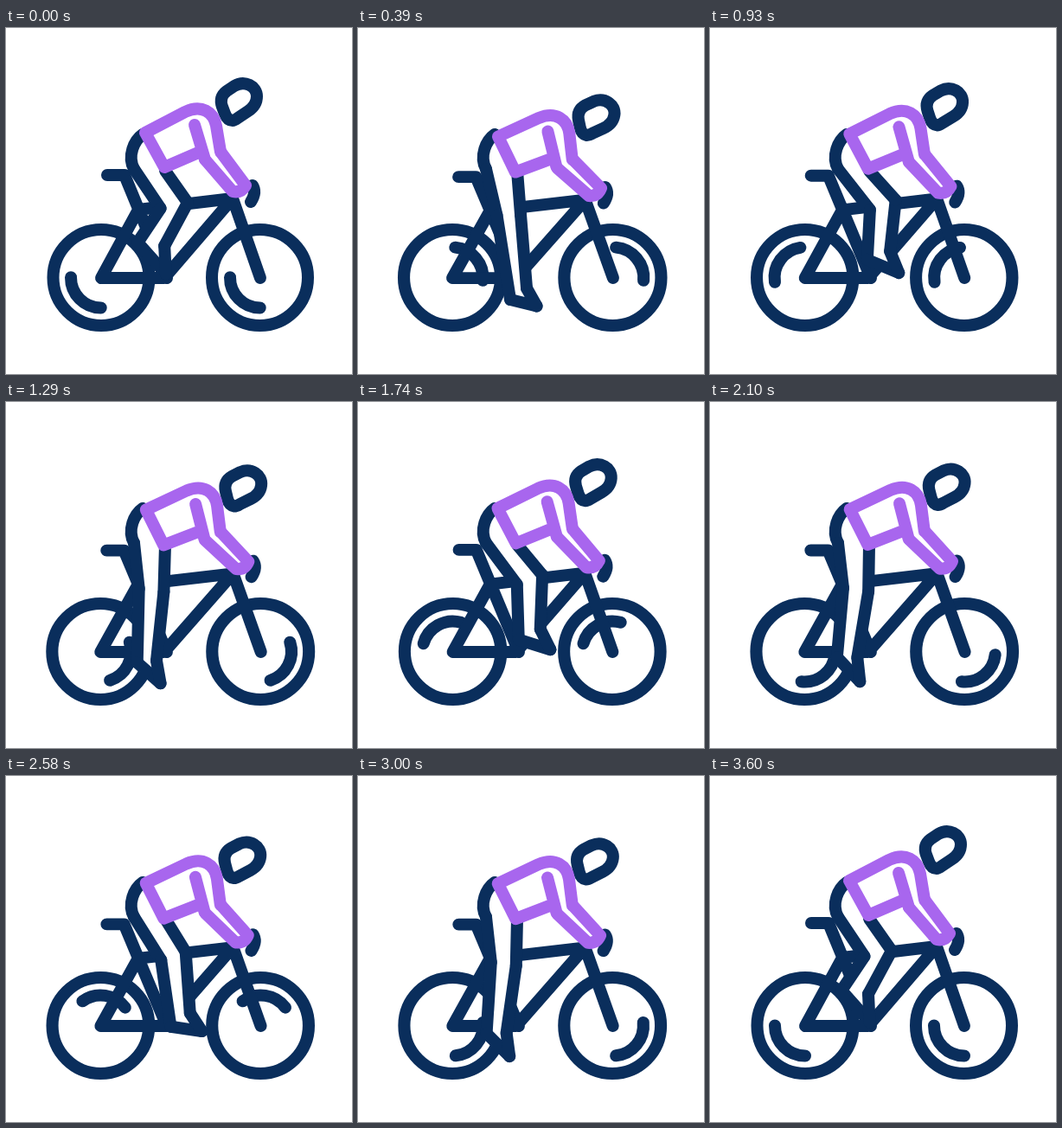
These frames come from a looping animation (400 px wide and 400 px high, 5.63 s). An HTML page without scripts:

```html
<!DOCTYPE html>
<html lang="en">
<head>
<meta charset="utf-8">
<title>Cyclist</title>
<style>
@property --turn { syntax: "<angle>"; inherits: true; initial-value: 0deg; }
@property --spin { syntax: "<angle>"; inherits: true; initial-value: 0deg; }

html, body { margin: 0; width: 100%; height: 100%; overflow: hidden; background: #fff; }
svg { display: block; width: 100%; height: 100%; animation: ride 5630ms linear infinite; }

/* Four turns of pedals and wheels: steady, then coasting to rest */
@keyframes ride {
  0% { --turn: 0deg; --spin: 0deg; }
  47.96% { --turn: 1242deg; --spin: 1280deg; animation-timing-function: cubic-bezier(.3, .4, .7, .8); }
  63.94%, 100% { --turn: 1440deg; --spin: 1440deg; }
}

.line {
  --c: cos(var(--turn));
  --s: sin(var(--turn));
  --bob: calc((1 - var(--c)) / 2);
  fill: none; stroke: #0a2e5c; stroke-width: 14; stroke-linecap: round; stroke-linejoin: round;
}
.shirt { stroke: #a866ee; }
.solid { fill: #fff; }

.wheels { transform-origin: 202px 289px; transform: scale(calc(1 + .01 * var(--bob)), 1); }
.shine { transform: rotate(var(--spin)); }
.rear { transform-origin: 110px 288.5px; }
.front { transform-origin: 294px 288.5px; }
.frame {
  transform-origin: 202px 290px;
  transform: scale(calc(1 + .01 * var(--bob)), calc(1 - .018 * var(--bob)));
}
.head {
  transform-origin: 270px 86px;
  transform: translate(calc(5.5px * var(--bob)), calc(18.5px * var(--bob))) rotate(calc(9deg * var(--bob)));
}
.body {
  transform-origin: 161px 121px;
  transform: translate(calc(1px * var(--bob)), calc(4.5px * var(--bob))) rotate(calc(3deg * var(--bob)));
}
.forearm { transform-origin: 240px 147px; transform: rotate(calc(-11deg * var(--bob))); }

/* Joints circle with the pedals: back of knee, heel, toe, ankle, kneecap */
.leg {
  --bx: calc(169.5 + 9 * var(--c) + 13 * var(--s));
  --by: calc(212.5 - 4 * var(--c) - 1 * var(--s));
  --hx: calc(164 - 12 * var(--c) + 24 * var(--s));
  --hy: calc(281 - 33 * var(--c) - 1 * var(--s));
  --tx: calc(195.5 - 11 * var(--c) + 29 * var(--s));
  --ty: calc(303 - 18.5 * var(--c) - 14 * var(--s));
  --ax: calc(189 - 6 * var(--c) + 23 * var(--s));
  --ay: calc(276.5 - 24.5 * var(--c) - 10 * var(--s));
  --kx: calc(199 + 11 * var(--c) + 12.5 * var(--s));
  --ky: calc(209 - 7 * var(--c) - 8 * var(--s));
}
.skin {
  fill: #fff; stroke: none;
  clip-path: polygon(158px 122px, 146px 148px, 148px 163px,
    calc(var(--bx) * 1px) calc(var(--by) * 1px), calc(var(--hx) * 1px) calc(var(--hy) * 1px),
    calc(var(--tx) * 1px) calc(var(--ty) * 1px), calc(var(--ax) * 1px) calc(var(--ay) * 1px),
    calc(var(--kx) * 1px) calc(var(--ky) * 1px), 184px 165px);
}
/* A stroke from (x, y) to (u, v), cut to length by its dash */
.edge {
  --dx: calc(var(--u) - var(--x));
  --dy: calc(var(--v) - var(--y));
  transform: translate(calc(var(--x) * 1px), calc(var(--y) * 1px)) rotate(atan2(var(--dy), var(--dx)));
  stroke-dasharray: calc(hypot(var(--dx), var(--dy)) * 1px) 999px;
}
.thigh-back { --x: 148; --y: 163; --u: var(--bx); --v: var(--by); }
.calf { --x: var(--bx); --y: var(--by); --u: var(--hx); --v: var(--hy); }
.sole { --x: var(--hx); --y: var(--hy); --u: var(--tx); --v: var(--ty); }
.instep { --x: var(--tx); --y: var(--ty); --u: var(--ax); --v: var(--ay); }
.shin { --x: var(--ax); --y: var(--ay); --u: var(--kx); --v: var(--ky); }
.thigh-front { --x: var(--kx); --y: var(--ky); --u: 184; --v: 165; }
</style>
</head>
<body>
<svg viewBox="0 0 400 400">
  <g class="line">
    <g class="wheels">
      <circle cx="110" cy="288.5" r="55.5"/>
      <circle cx="293.5" cy="288.5" r="55.5"/>
      <path class="shine rear" d="M75 288.5A35 35 0 0 0 110 323.5"/>
      <path class="shine front" d="M259 288.5A35 35 0 0 0 294 323.5"/>
    </g>
    <g class="frame">
      <path d="M117 170H137L186 289M153 210L110 289H183L262 197L153 210M262 197L294 289"/>
      <path d="M285 182Q290 190 283 201"/>
    </g>
    <g class="leg">
      <rect class="skin" width="400" height="400"/>
      <path d="M158 123C148 130 140 148 148 163"/>
      <path class="edge thigh-back" d="M0 0H200"/>
      <path class="edge calf" d="M0 0H200"/>
      <path class="edge sole" d="M0 0H200"/>
      <path class="edge instep" d="M0 0H200"/>
      <path class="edge shin" d="M0 0H200"/>
      <path class="edge thigh-front" d="M0 0H200"/>
    </g>
    <path class="head" d="M262 107Q256 107 253 99L250 91Q246 80 255 73L264 67C276 60 290 67 290 79C290 87 286 92 280 96L268 104Q264 107 262 107Z"/>
  </g>
  <g class="line shirt">
    <g class="body">
      <path class="forearm solid" d="M248 143L277 182Q272 191 262 189L230 152"/>
      <path class="solid" d="M161 121L207 97C226 88 240 97 243 113L248 143L230 152L218 112" stroke="none"/>
      <path d="M161 121L207 97C226 88 240 97 243 113L248 143M230 152L218 112M161 121L183 161L227 142"/>
    </g>
  </g>
</svg>
</body>
</html>
```
